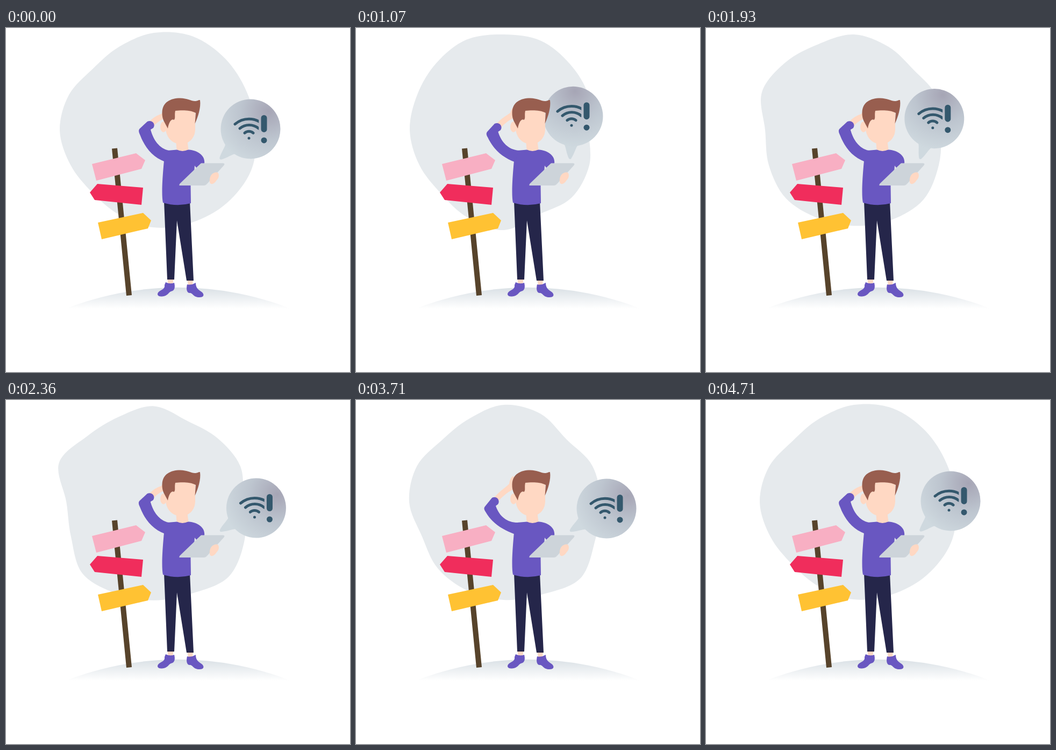
Write an HTML page that moves like this. It is 640 px wide and 640 px high and loops after 4780 ms.

```html
<!DOCTYPE html>
<html lang="en">
<head>
<meta charset="utf-8">
<title>No connection</title>
<style>
  html, body { margin: 0; width: 100%; height: 100%; overflow: hidden; background: #fff; }
  svg { display: block; width: 100%; height: 100%; }
  .skin { fill: #ffd8c3; }
  .purple { fill: #6957c1; }
  .tablet { fill: #cdd4da; }
  .wifi { fill: none; stroke: #34586d; stroke-width: 5; stroke-linecap: round; }
  .mark { fill: #34586d; }
</style>
</head>
<body>
<svg viewBox="0 0 640 640">
  <defs>
    <linearGradient id="haze" gradientUnits="userSpaceOnUse" x1="0" y1="482" x2="0" y2="522">
      <stop offset="0" stop-color="#d9e0e5"/>
      <stop offset="1" stop-color="#fff"/>
    </linearGradient>
    <radialGradient id="shade" gradientUnits="userSpaceOnUse" cx="127" cy="0" r="105">
      <stop offset="0" stop-color="#a6a5b5"/>
      <stop offset=".5" stop-color="#bdc5cf"/>
      <stop offset="1" stop-color="#cfd9df"/>
    </radialGradient>
    <clipPath id="cut"><rect x="-40" y="-40" width="55.3" height="80"/></clipPath>
  </defs>

  <path id="blob" fill="#e6eaed"/>
  <path fill="url(#haze)" d="M104 525A576 576 0 0 1 537 525Z"/>

  <g id="sign">
    <path fill="#57432b" d="M197 224.5L207 223.5 234 497 224 498Z"/>
    <path fill="#f8afc3" d="M160 253L242 233 259 246 252 262 168 284Z"/>
    <path fill="#f02d5c" d="M156 306L170 290 255 297 252 329 165 320Z"/>
    <path fill="#ffc233" d="M171 362L255 344 270 358 264 373 178 393Z"/>
  </g>

  <g id="bubble" fill="url(#shade)">
    <circle cx="80" r="55.5"/>
    <path d="M1 -2C10 -7 17 -8 25 -11.5Q31 -15 33 -29L60 0 33 29Q31 15 25 11.5C17 8 10 7 1 2Q-1 0 1 -2Z"/>
  </g>
  <g id="icon">
    <g class="wifi" clip-path="url(#cut)">
      <path d="M-29 -9A40 40 0 0 1 23 -9M-20 -1A27 27 0 0 1 15 -1M-11 7.500A12 12 0 0 1 5 7.500"/>
    </g>
    <circle class="mark" cx="-3" cy="17" r="2.5"/>
    <rect class="mark" x="19.500" y="-26" width="11" height="32" rx="5.500"/>
    <circle class="mark" cx="25" cy="21" r="5.500"/>
  </g>

  <g id="person">
    <path class="skin" d="M300 466H312L310 477H302ZM337 468H348L347 478H339Z"/>
    <path class="purple" d="M297 473Q305 477 313 474C315 482 314 489 307 490C303 491 301 499 290 499.500C282 500 280 495 284 491C290 486 296 486 295 478Z"/>
    <path class="purple" d="M337 477Q345 479 353 474C353 484 358 487 364 491C370 496 368 501 360 501C348 501 348 493 342 493C336 493 335 485 337 477Z"/>
    <path fill="#25264a" d="M294 322H342L349 470H336L318 358 313 468H300Z"/>
    <path id="forearm" class="skin"/>
    <path class="purple" d="M300 228L318 226.500H340C358 228 371 238 369 252L362 253 354 260 351 256 350 270 343.500 293 344 326Q318 333 292 325C289 310 291 278 294 247Z"/>
    <path id="sleeve" class="purple"/>
    <path class="tablet" d="M363 251.500H404Q408 252 405 256L373 291Q371 293 368 293H322.500Q322 291 324 289Z"/>
    <path class="skin" d="M379 287C378 276 383 268 393 268.500C398 271 396 280 392 283C388 290 381 293 379 287Z"/>
    <path class="skin" d="M316 208H337L339.500 226Q328 232 317.500 226Z"/>
    <ellipse class="skin" cx="293" cy="184" rx="6" ry="10"/>
    <path class="skin" d="M300 160L315 150H352V188C352 205 340 216 326 216C310 216 297 204 297 185Z"/>
    <path fill="#985e4f" d="M301 187C296 176 290 171 290.500 157C291 138 306 130.500 324 130.500C338 130.500 346 137 353 136C357 136 359 133 361 134.500C363 148 357 166 351.500 178L353 158C342 152 325 153 315 154C313 162 316 168 312.500 171C308 168 303 175 301 187Z"/>
  </g>
</svg>

<script>
const LOOP = 4780;
const $ = id => document.getElementById(id);

// Monotone cubic curve through the given keys
function curve(times, vals, t) {
  const last = times.length - 1;
  let i = 0;
  while (i < last - 1 && t > times[i + 1]) i++;
  const rise = k => (vals[k + 1] - vals[k]) / (times[k + 1] - times[k]);
  const slope = k => {
    if (k === 0) return rise(0);
    if (k === last) return rise(last - 1);
    const a = rise(k - 1), b = rise(k);
    return a * b > 0 ? 2 * a * b / (a + b) : 0;
  };
  const h = times[i + 1] - times[i];
  const u = Math.min(1, (t - times[i]) / h), v = 1 - u;
  return vals[i] * v * v * (1 + 2 * u) + vals[i + 1] * u * u * (3 - 2 * u)
    + h * u * v * (slope(i) * v - slope(i + 1) * u);
}

// Backdrop: radii at 16 even angles, clockwise from the right
const round = [191, 196, 192, 186, 181, 170, 163, 168, 175, 171, 161, 168, 181, 189, 188, 187];
const egg   = [166, 177, 183, 177, 184, 172, 163, 169, 172, 170, 172, 179, 179, 182, 178, 174];
const pear  = [158, 172, 178, 170, 186, 176, 166, 170, 175, 174, 177, 182, 178, 180, 174, 170];
const pebble = [162, 171, 183, 181, 178, 177, 179, 171, 165, 185, 179, 173, 178, 168, 158, 166];
const star  = [168, 191, 204, 185, 186, 188, 191, 164, 162, 193, 171, 171, 179, 162, 175, 180];
const stone = [180, 184, 201, 186, 182, 178, 174, 165, 176, 175, 163, 168, 181, 178, 165, 178];
const blobTimes = [0, 570, 1070, 1450, 1930, 2700, 3200, 3710, 4640, 4710];
const blobShapes = [round, egg, pear, pear, pebble, star, star, stone, round, round];

function blobPath(t) {
  const pts = round.map((_, i) => {
    const r = curve(blobTimes, blobShapes.map(s => s[i]), t), a = i * Math.PI / 8;
    return [275 + r * Math.cos(a), 190 + r * Math.sin(a)];
  });
  const n = pts.length, p = i => pts[(i + n) % n];
  const handle = (i, dir) => [0, 1].map(k => p(i)[k] + dir * (p(i + 1)[k] - p(i - 1)[k]) / 6);
  return "M" + p(0) + pts.map((_, i) => `C${handle(i, 1)} ${handle(i + 1, -1)} ${p(i + 1)}`).join("") + "Z";
}

// Bubble swings around the tip of its tail
const swingTimes = [0, 570, 1070, 1380, 1710, 1930, 2290, 2930, 3430, 3710, 4000, 4640, 4710];
const swing = [0, -29.4, -41.2, -43, -41.8, -26, 8.5, 29.6, 25.4, 12.8, 6, 0.2, 0];

// Scratching arm: raised and lowered poses
const sleeve = [
  "M303 228C285 224 274 208 269 189L274 186C279 179 272 170 263 174L249 187C246 190 247 194 249 198C258 222 272 240 296 249Z",
  "M303 228C283 229 267 218 260 197L264 194C269 187 262 177 253 182L240 198C237 202 239 205 241 208C253 229 272 241 296 250Z"
];
const forearm = [
  "M266 175C274 166 282 162 289 160C291 157 292 155 294 154L296 168C287 171 281 176 275 182Z",
  "M256 183C265 171 276 165 285 156C286 149 288 144 293 141L296 165C285 169 274 178 266 187Z"
];
function mix([a, b], k) {
  const to = b.match(/\d+/g);
  let i = 0;
  return a.replace(/\d+/g, n => (+n + (to[i++] - n) * k).toFixed(2));
}

function draw(t) {
  $("blob").setAttribute("d", blobPath(t));

  const deg = curve(swingTimes, swing, t) - 44.5, rad = deg * Math.PI / 180;
  $("bubble").setAttribute("transform", `translate(398 244) rotate(${deg})`);
  $("icon").setAttribute("transform", `translate(${398 + 80 * Math.cos(rad)} ${244 + 80 * Math.sin(rad)})`);

  const k = (1 - Math.cos(2 * Math.PI * Math.min(t / 390, 12))) / 2;
  $("sleeve").setAttribute("d", mix(sleeve, k));
  $("forearm").setAttribute("d", mix(forearm, k));
}

const start = performance.now();
function tick() {
  draw((performance.now() - start) % LOOP);
  requestAnimationFrame(tick);
}
draw(0);
requestAnimationFrame(tick);
</script>
</body>
</html>
```
